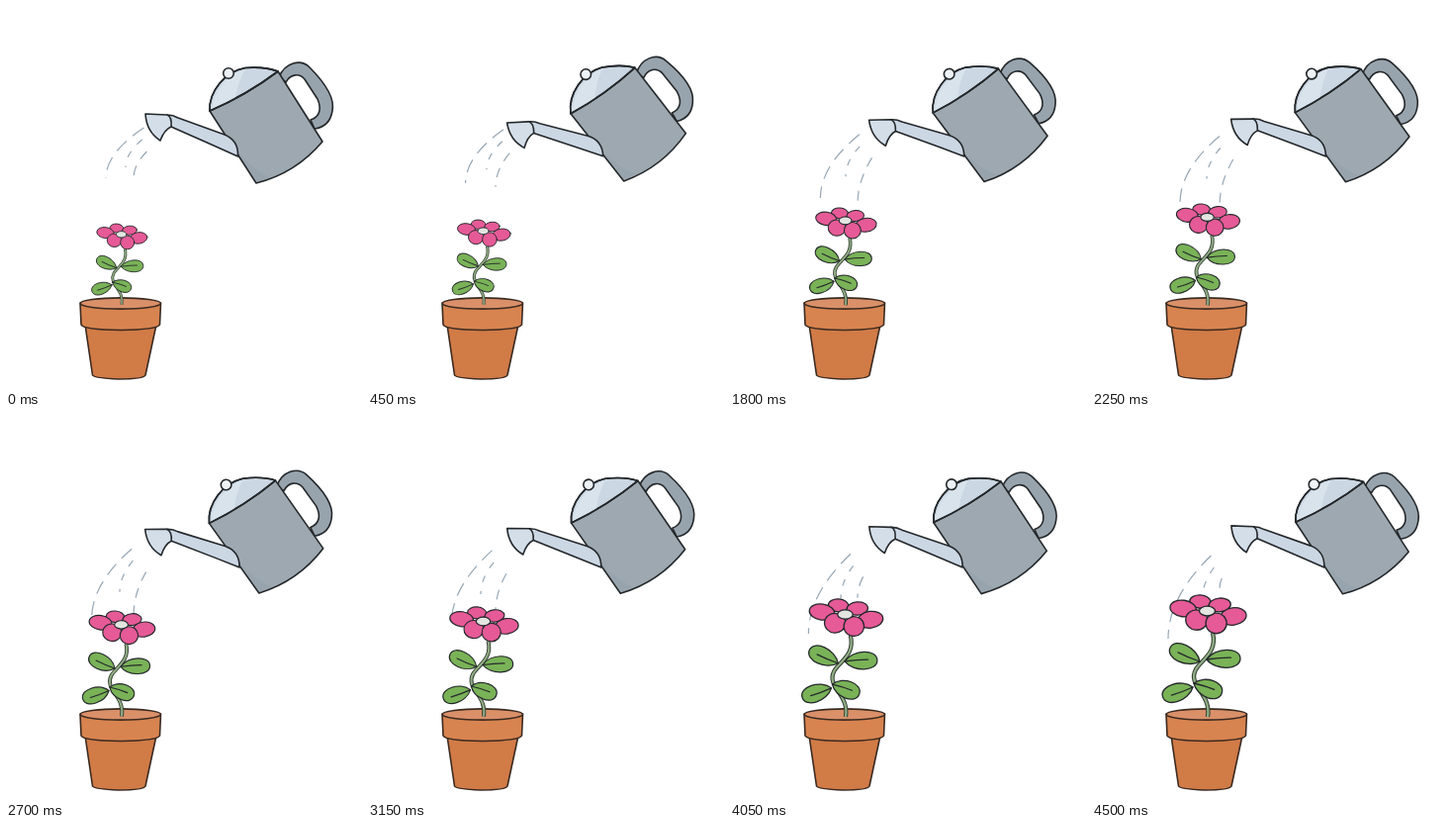
Recreate the animation shown at these times as an HTML page. Size 360 by 387 pixels, loop 4950 ms.

```html
<!DOCTYPE html>
<html lang="en">
<head>
<meta charset="utf-8">
<title>Watering a flower</title>
<style>
  html, body { margin: 0; width: 100%; height: 100%; overflow: hidden; background: #fff; }
  svg { display: block; width: 100%; height: 100%; }
  .ink { stroke: #24282b; stroke-width: 1.6; stroke-linejoin: round; stroke-linecap: round; }
  .line { fill: none; }
  .pot { stroke: #3b2a20; }
  #plant .ink { stroke-width: 1.3; }
  #leaves { fill: #79b257; }
  #petals { fill: #e55a97; }
  #water { fill: none; stroke: #97a7b5; stroke-width: 1.2; }
</style>
</head>
<body>
<svg viewBox="0 0 360 387">
  <g id="pot" class="ink pot">
    <path d="M80 322L87.500 373Q89 376 114 377Q139 377 141 373L152 322Z" fill="#d17b47"/>
    <path d="M75 300L76 322Q78 327 116 327.500Q153 327 155.500 322L156.500 300Z" fill="#d88450"/>
    <ellipse cx="115.800" cy="300.500" rx="40.600" ry="5.600" fill="#da9069"/>
  </g>

  <g id="water"></g>

  <g id="plant">
    <path id="stemEdge" fill="none" stroke="#344032" stroke-width="4.400"/>
    <path id="stemFill" fill="none" stroke="#91ad85" stroke-width="2.300"/>
    <g id="leaves" class="ink"></g>
    <g id="petals" class="ink"></g>
    <ellipse class="ink" cx="116.500" cy="196" rx="8" ry="4.800" fill="#e3e5e1"/>
  </g>

  <g id="can" class="ink">
    <path d="M276 72C282 57 298 53 307 62C319 74 333 92 330 106C328 118 320 123 312 124L308 115C318 112 319 103 315 94L302 74C297 68 288 68 283 77Z" fill="#98a4ad"/>
    <path d="M206 106Q243 90 275 66L320 137Q293 169 253 179Z" fill="#9da8b0"/>
    <path d="M236 149L253 177L266 173Q249 165 236 149Z" fill="#98a4ad" stroke="none"/>
    <path d="M206 106C205 86 222 66 242 62.500Q262 61 275 66Q243 90 206 106Z" fill="#cbd7e3"/>
    <path d="M208 104C209 87 224 69 242 64Q234 78 232 93Z" fill="#d9e3ec" stroke="none"/>
    <path class="line" d="M206 106C205 86 222 66 242 62.500Q262 61 275 66Q243 90 206 106Z"/>
    <circle cx="225" cy="68" r="5.300" fill="#edf2f6"/>
    <path d="M163 110Q169 110 174 113L221 130C231 134 235 142 234.500 152L210 141L167 122Z" fill="#ccd7e4"/>
    <path d="M141 109L163 110Q168 112 167 122Q160 125 156 136Q142 127 141 109Z" fill="#d3dee9"/>
  </g>
</svg>
<script>
const STEP = 450, STEPS = 11;
const $ = id => document.getElementById(id);

function add(parent, tag, attrs) {
  const node = document.createElementNS('http://www.w3.org/2000/svg', tag);
  for (const [name, value] of Object.entries(attrs)) node.setAttribute(name, value);
  return parent.appendChild(node);
}

function leaf(x, y, length, tilt) {
  const w = 12, near = length * .25;
  const g = add($('leaves'), 'g', { transform: `translate(${x} ${y}) rotate(${tilt})` });
  add(g, 'path', { d: `M0 0C${near} ${-w} ${length} ${-w} ${length} 0C${length} ${w} ${near} ${w} 0 0Z` });
  add(g, 'path', { class: 'line', d: `M0 0Q${length * .4} -1.5 ${length * .72} -1` });
}

// Petals sit on a tilted ring seen from above; nearer ones are larger.
function petal(angle) {
  const c = Math.cos(angle), s = Math.sin(angle);
  const dx = 25.5 * (.7 * c + .3 * c ** 3);
  const cx = 117.5 + dx, cy = 197.5 + 11 * s + .12 * dx;
  add($('petals'), 'ellipse', {
    cx, cy, rx: 10 + 3.3 * c * c, ry: 8.5 + 2 * s,
    transform: `rotate(${-8 * c} ${cx} ${cy})`
  });
}

function buildPlant() {
  const stem = 'M122 218C127 238 111 245 105 255C96 272 121 279 117 303';
  $('stemEdge').setAttribute('d', stem);
  $('stemFill').setAttribute('d', stem);
  leaf(109, 247, 33, 205);
  leaf(116, 245, 34, -2);
  leaf(102, 273, 32, 162);
  leaf(103, 269, 30, 20);
  Array.from({ length: 6 }, (_, i) => (5 + 60 * i) * Math.PI / 180)
    .sort((a, b) => Math.sin(a) - Math.sin(b))
    .forEach(petal);
}

// Each jet is a parabola from the nozzle; its visible part starts at height `top`.
const jets = [
  { x: 141, y: 122, dash: '14 8', fall: k => ({ top: 123 + 1.7 * k, endX: 101 - 2.4 * k, endY: 174 + 5 * k }) },
  { x: 147, y: 128, dash: '7 9', fall: k => ({ top: 135 + 1.7 * k, endX: 121 - k, endY: 163 + 2.3 * k }) },
  { x: 157, y: 135, dash: '10 8', fall: k => ({ top: 147 + 1.6 * k, endX: 129, endY: 174 + 28 * Math.sin(Math.PI * k / 10) }) }
];
for (const jet of jets) jet.node = add($('water'), 'path', { 'stroke-dasharray': jet.dash });

function drawJet({ x, y, fall, node }, step) {
  const { top, endX, endY } = fall(step);
  const left = (endY - top) / (endY - y);
  const topX = endX + (x - endX) * left ** 2;
  node.setAttribute('d', `M${topX} ${top}Q${endX} ${(top + endY) / 2} ${endX} ${endY}`);
}

function draw(step) {
  const tilt = -.55 * ((STEPS - step) % STEPS);
  const size = (51 + 2.6 * step) / 77;
  $('can').setAttribute('transform', `rotate(${tilt} 234 118)`);
  $('plant').setAttribute('transform', `translate(117 299) scale(${size}) translate(-117 -299)`);
  jets.forEach(jet => drawJet(jet, step));
}

function tick() {
  draw(Math.floor(performance.now() / STEP) % STEPS);
  requestAnimationFrame(tick);
}

buildPlant();
tick();
</script>
</body>
</html>
```
